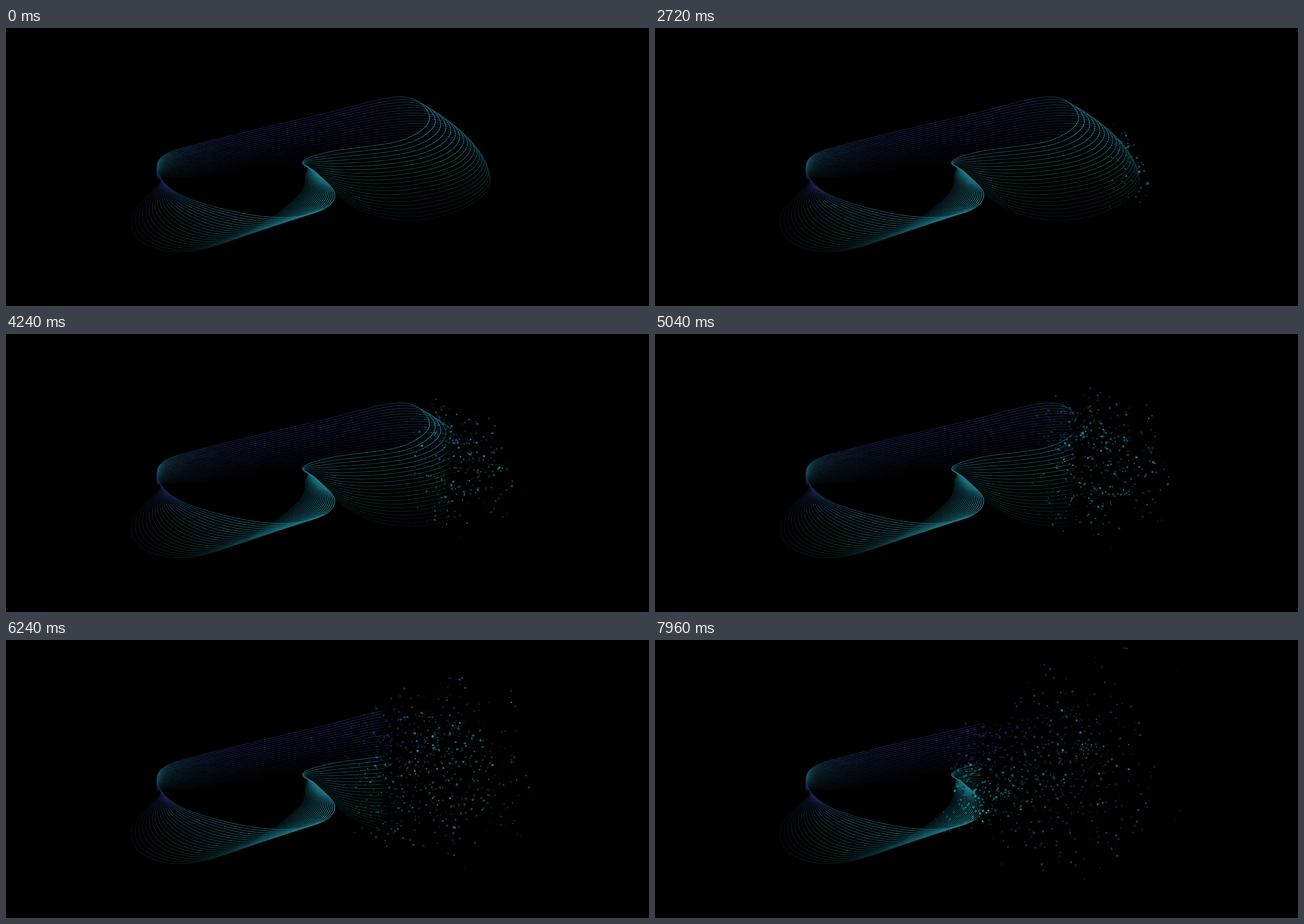
Recreate the animation shown at these times as an HTML page with a canvas. Size 1137 by 493 pixels, loop 8000 ms.

```html
<!DOCTYPE html>
<html lang="en">
<head>
<meta charset="utf-8">
<title>Dissolving ribbon</title>
<style>
  html, body { margin: 0; width: 100%; height: 100%; overflow: hidden; background: #000; }
  canvas { display: block; }
</style>
</head>
<body>
<canvas id="stage" width="1137" height="493"></canvas>
<script>
const W = 1137, H = 493, LOOP = 8000, STEP = 40, START = 1400;
const CURVES = 21, SUB = 20, DOTS = 1300;
const ctx = document.getElementById('stage').getContext('2d');

// Key points of the upper edge, a closed loop from the left neck along the front
const edge = [
  [272, 264], [315, 299], [410, 327], [495, 336], [560, 322],
  [581, 293], [548, 256], [525, 237], [575, 219], [700, 199],
  [749, 160], [700, 122], [550, 155], [350, 203], [277, 228]
];
const N = edge.length;

const lerp = (a, b, u) => a + (b - a) * u;
const clamp = v => Math.max(0, Math.min(1, v));
const smooth = v => (v = clamp(v), v * v * (3 - 2 * v));

// Rises from 0 at `from` to 1 at `peak`, back to 0 at `to`
function hump(t, from, peak, to) {
  const d = t < peak ? (peak - t) / (peak - from) : (t - peak) / (to - peak);
  return (1 + Math.cos(Math.PI * clamp(d))) / 2;
}

function spline(t, c) {
  const i = Math.floor(t), u = t - i;
  const [p, q, r, s] = [-1, 0, 1, 2].map(d => edge[(i + d + N) % N][c]);
  return q + u / 2 * (r - p + u * (2 * p - 5 * q + 4 * r - s + u * (3 * (q - r) + s - p)));
}

// s sweeps the upper edge (0) out to the lower edge (1)
function point(t, s) {
  const x = spline(t, 0), y = spline(t, 1);
  const dx = 108 * hump(t, 5.75, 10, 12.25) - 175 * hump(t, 0, 2.15, 7);
  const fall = t < 8.65 ? hump(t, 6.4, 8.65, 15) : clamp((N - t) / 6.35) ** .7;
  const dy = 61 * hump(t, .4, 2.65, 5.5) + 132 * fall;
  const bulge = 100 * s * (1 - s) * smooth((x - 640) / 100);
  return [x + dx * s + bulge, y + dy * s];
}

const TEAL = [32, 134, 150], NAVY = [40, 42, 128];

function tint(t, s) {
  const navy = Math.max(hump(t, 10, 12, 14.6), hump(t, 14, 15, 16), hump(t, -1, 0, 2));
  const level = .7 + .3 * hump(t, 1, 5, 8.2) + .25 * hump(t, 8.4, 10, 11);
  const behind = 1 - .85 * smooth(s * 3) * hump(t, 6.3, 7.1, 7.9);
  const dim = level * behind * (1 - lerp(.78, .9, navy) * s ** 1.2);
  return { rgb: TEAL.map((v, i) => lerp(v, NAVY[i], navy) * dim), width: .35 + .8 * level };
}

const css = rgb => `rgb(${rgb.map(Math.round).join()})`;

function drawRibbon() {
  const layer = document.createElement('canvas');
  layer.width = W;
  layer.height = H;
  const g = layer.getContext('2d');
  g.lineCap = 'round';
  g.globalCompositeOperation = 'lighten';
  for (let c = 0; c < CURVES; c++) {
    const s = c / (CURVES - 1);
    for (let k = 0; k < N * SUB; k++) {
      const t = k / SUB, { rgb, width } = tint(t, s);
      g.strokeStyle = css(rgb);
      g.lineWidth = width;
      g.beginPath();
      g.moveTo(...point(t, s));
      g.lineTo(...point((k + 1) / SUB, s));
      g.stroke();
    }
  }
  return layer;
}

let seed = 7;
function rand() {
  seed = seed + 0x6D2B79F5 | 0;
  let x = Math.imul(seed ^ seed >>> 15, 1 | seed);
  x ^= x + Math.imul(x ^ x >>> 7, 61 | x);
  return ((x ^ x >>> 14) >>> 0) / 4294967296;
}

// The dissolving front sweeps left at constant speed
const SPEED = .0557;
const frontAt = t => 787 - SPEED * (t - 4240);
const timeAt = x => 4240 + (787 - x) / SPEED;

// Dots start on the ribbon, evenly spread along its length
function makeDot() {
  let t, s, x, y, length;
  do {
    t = lerp(4, 12.3, rand());
    s = rand();
    [x, y] = point(t, s);
    const [nx, ny] = point(t + .05, s);
    length = Math.hypot(nx - x, ny - y) * 20;
  } while (rand() > length / 200 || x < 480);
  return {
    x, y,
    color: css(tint(t, s * .5).rgb.map(v => v * 1.25)),
    born: Math.max(START, timeAt(x + 45 + 65 * rand())),
    vx: lerp(-.004, .02, rand()),
    vy: (rand() + rand() - 1) * .036,
    r: 1.2 + 1.1 * rand() ** 1.5,
    glow: .2 + .8 * rand() ** 1.3,
    life: 4500 + 2000 * rand()
  };
}

const ribbon = drawRibbon();
const dots = Array.from({ length: DOTS }, makeDot);

function drawDots(t) {
  for (const d of dots) {
    const age = t - d.born;
    if (age <= 0 || age >= d.life) continue;
    ctx.globalAlpha = d.glow * smooth(age / 1000) * smooth((d.life - age) / 1600);
    ctx.fillStyle = d.color;
    ctx.beginPath();
    ctx.arc(d.x + d.vx * age, d.y + d.vy * age, d.r, 0, 7);
    ctx.fill();
  }
  ctx.globalAlpha = 1;
}

function render(now) {
  const t = Math.floor(now % LOOP / STEP) * STEP;
  ctx.fillStyle = '#000';
  ctx.fillRect(0, 0, W, H);
  ctx.drawImage(ribbon, 0, 0);
  if (t < START) return;
  const front = frontAt(t);
  const fade = ctx.createLinearGradient(front - 20, 0, front + 3, 0);
  fade.addColorStop(0, 'rgba(0,0,0,0)');
  fade.addColorStop(1, '#000');
  ctx.fillStyle = fade;
  ctx.fillRect(front - 20, 0, W, H);
  drawDots(t);
}

function tick() {
  render(performance.now());
  requestAnimationFrame(tick);
}
tick();
</script>
</body>
</html>
```
